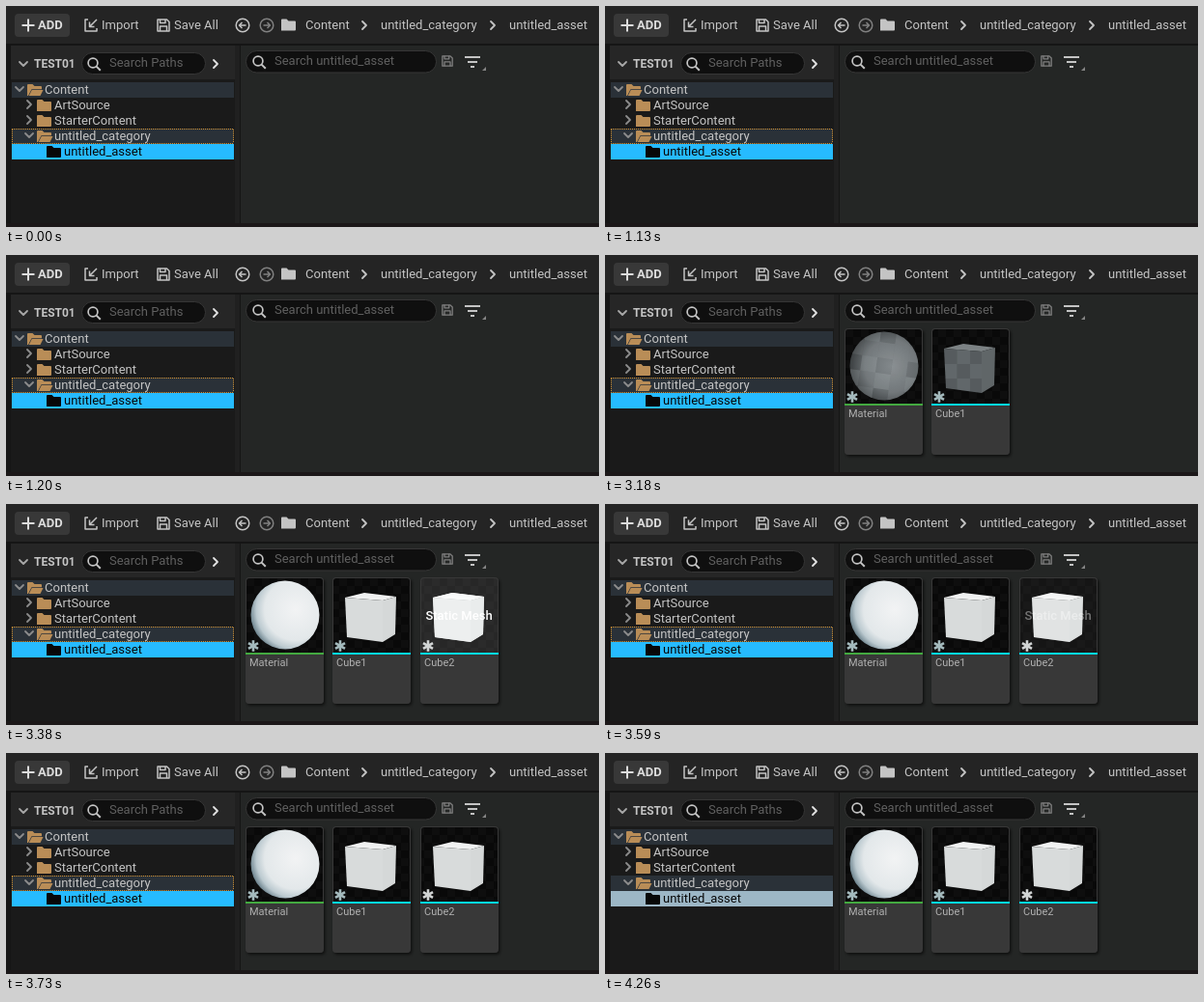
An HTML page that plays this animation: 614 px wide and 229 px high, repeating every 4590 ms.

```html
<!DOCTYPE html>
<html lang="en">
<head>
<meta charset="utf-8">
<title>Content browser</title>
<style>
  html, body { margin: 0; width: 100%; height: 100%; overflow: hidden; background: #151515; }
  svg { display: block; width: 614px; height: 229px; }
  text { font: 13px Roboto, Arial, sans-serif; fill: #c4c4c4; white-space: pre; }
  .bold { font-weight: 700; }
  .hint { fill: #606060; }
  .label { font-size: 11px; fill: #b0b0b0; }
  .line { fill: none; stroke: #c4c4c4; stroke-width: 1.5; stroke-linejoin: round; }
  .chev { stroke-width: 1.8; stroke-linecap: round; }
  .pill { fill: #0f0f0f; stroke: #363636; }
</style>
</head>
<body>
<svg id="stage" viewBox="0 0 614 229">
  <defs>
    <pattern id="checks" width="16" height="16" patternUnits="userSpaceOnUse" x="249" y="77">
      <rect width="16" height="16" fill="#090909"/>
      <path d="M0 0h8v8h-8zM8 8h8v8h-8z" fill="#0e0e0e"/>
    </pattern>
    <radialGradient id="ball" cx=".65" cy=".42" r=".68">
      <stop offset="0" stop-color="#f2f3f4"/>
      <stop offset=".66" stop-color="#e3e8ea"/>
      <stop offset=".84" stop-color="#bccad0"/>
      <stop offset="1" stop-color="#627984"/>
    </radialGradient>
    <radialGradient id="dullBall" cx=".6" cy=".5" r=".64">
      <stop offset="0" stop-color="#858b8e"/>
      <stop offset=".6" stop-color="#6c7275"/>
      <stop offset="1" stop-color="#35393b"/>
    </radialGradient>
    <clipPath id="disc"><circle cx="289" cy="115" r="35.5"/></clipPath>
    <clipPath id="front"><path d="M351 97L390 100L390 143L353 138Z"/></clipPath>
    <filter id="soft" x="-20%" y="-20%" width="140%" height="140%">
      <feDropShadow dx="1.5" dy="2" stdDeviation="1.5" flood-color="#000" flood-opacity=".6"/>
    </filter>
  </defs>
</svg>
<script>
const LOOP = 4590;
const CARDS_AT = 3180, LIT_AT = 3250, NEW_AT = 3380, DONE_AT = 3730, BLUR_AT = 4260, STEP = 70;
const stage = document.getElementById('stage');

function add(tag, attrs, parent = stage) {
  const el = document.createElementNS('http://www.w3.org/2000/svg', tag);
  for (const k in attrs) el.setAttribute(k, attrs[k]);
  parent.appendChild(el);
  return el;
}
const group = parent => add('g', {}, parent);
const rect = (x, y, width, height, fill, rx = 0, parent) =>
  add('rect', { x, y, width, height, fill, rx }, parent);
const path = (d, attrs, parent) => add('path', { d, ...attrs }, parent);
const line = (d, attrs = {}, parent) => path(d, { class: 'line', ...attrs }, parent);
function text(x, y, value, attrs = {}, parent) {
  const el = add('text', { x, y, ...attrs }, parent);
  el.textContent = value;
  return el;
}
function chevron(x, y, down, size = 4, stroke = '#c4c4c4') {
  const h = size / 2;
  const d = down ? `M${x - size} ${y - h}l${size} ${size}l${size} ${-size}`
                 : `M${x - h} ${y - size}l${size} ${size}l${-size} ${size}`;
  line(d, { class: 'line chev', style: `stroke:${stroke}` });
}
function folder(x, y, fill, open) {
  const back = `M${x} ${y + 12}v-11q0-1 1-1h4.5l2 2h6.5q1 0 1 1v`;
  if (open) {
    path(back + `2.2h-10.5l-3.5 6.8z`, { fill });
    path(`M${x + 4.8} ${y + 6}h11.7l-3 6h-11.8z`, { fill });
  } else {
    path(back + `8q0 1-1 1h-14z`, { fill });
  }
}
function lens(x, y) {
  add('circle', { class: 'line', cx: x - 1, cy: y - 1, r: 4.9, style: 'stroke-width:1.7' });
  line(`M${x + 2.6} ${y + 2.6}l4.2 4.2`, { style: 'stroke-width:2' });
}
function disk(x, y, s, color) {
  const g = add('g', { transform: `translate(${x} ${y}) scale(${s})` });
  const style = `stroke:${color}`;
  line('M1 1h9.5l2.5 2.500v9.500h-12z', { style }, g);
  line('M3.500 1v3.500h5.500v-3.500M3.500 13v-5h7v5', { style }, g);
}

// Panels
rect(0, 0, 614, 39, '#242424');
rect(5, 41, 232, 35, '#262626');
rect(5, 76, 232, 149, '#1a1a1a');
rect(237, 41, 5, 184, '#202020');
rect(243, 41, 371, 184, '#242625');
rect(0, 225, 614, 4, '#1b1718');

// Toolbar
rect(9, 8, 57, 24, '#383838', 4);
line('M16.500 20h13M23 13.500v13', { style: 'stroke-width:2;stroke:#dcdcdc' });
text(33, 24, 'ADD', { class: 'bold', style: 'fill:#dcdcdc' });
line('M85 14h-3v12h12v-3M94 14l-7 7M86.500 16.500v5h5');
text(99, 24, 'Import');
disk(156, 13, 1, '#c4c4c4');
text(174, 24, 'Save All');
for (const [x, dir, color] of [[245, -1, '#c4c4c4'], [270, 1, '#808080']]) {
  const style = `stroke:${color}`;
  add('circle', { class: 'line', cx: x, cy: 20, r: 6.8, style });
  line(`M${x - 3.5 * dir} 20h${7 * dir}m${-3 * dir} -3l${3 * dir} 3l${-3 * dir} 3`, { style });
}
folder(285, 13.5, '#c4c4c4', false);
text(310, 24, 'Content');
chevron(371, 20, false);
text(388, 24, 'untitled_category');
chevron(504, 20, false);
text(521, 24, 'untitled_asset');

// Search bars
chevron(18, 60, true, 4, '#a8a8a8');
text(29, 64, 'TEST01', { class: 'bold', style: 'font-size:12px' });
add('rect', { class: 'pill', x: 78.5, y: 48.5, width: 128, height: 22, rx: 11 });
lens(91, 60);
text(107, 63, 'Search Paths', { class: 'hint' });
chevron(217, 60, false, 4, '#e2e2e2');
add('rect', { class: 'pill', x: 248.5, y: 46.5, width: 197, height: 22.5, rx: 11 });
lens(262, 58);
text(278, 61, 'Search untitled_asset', { class: 'hint' });
disk(451, 51, .86, '#808080');
line('M475 53h16M478 58h10M481 63h4', { style: 'stroke-width:2' });
path('M497 63v4h-4z', { fill: '#858585' });

// Tree
rect(6, 79, 230, 16, '#2a3138');
rect(6, 127, 230, 16, '#2a3138');
const chosen = rect(6, 143, 230, 16, '#26bbff');
const dots = path('M6 127.500h230M6.500 128v14M235.500 128v14M6 142.500h230',
  { fill: 'none', stroke: '#d4912f', 'stroke-dasharray': '1 1' });
const TAN = '#b98d57';
[
  ['Content', 22, 'open'], ['ArtSource', 32, 'shut'], ['StarterContent', 32, 'shut'],
  ['untitled_category', 32, 'open'], ['untitled_asset', 42, 'leaf']
].forEach(([name, x, kind], i) => {
  const y = 87 + 16 * i, leaf = kind === 'leaf';
  if (!leaf) chevron(x - 8, y - 1, kind === 'open', 4, '#8c8c8c');
  folder(x, y - 6, leaf ? '#080808' : TAN, kind === 'open');
  text(x + 18, y + 4, name, leaf ? { style: 'fill:#080808' } : {});
});

// Asset cards
function card(x, name, accent) {
  const g = group();
  add('rect', { x, y: 76, width: 81, height: 131, rx: 4, fill: '#383838', filter: 'url(#soft)' }, g);
  path(`M${x + 1} 154v-74q0-3 3-3h73q3 0 3 3v74z`, { fill: 'url(#checks)' }, g);
  rect(x, 154, 81, 2, accent, 0, g);
  text(x + 4, 168, name, { class: 'label' }, g);
  return g;
}
function star(x, color, parent) {
  for (let i = 0; i < 3; i++)
    line('M0 -5.800V5.800', {
      transform: `translate(${x} 147) rotate(${i * 60})`,
      style: `stroke:${color};stroke-width:2.6`
    }, parent);
}
function cube(parent, front, top, side) {
  const g = group(parent);
  path('M351 97L371 92L404 96L390 100Z', { fill: top }, g);
  path('M390 100L404 96L403 135L390 143Z', { fill: side }, g);
  path('M351 97L390 100L390 143L353 138Z', { fill: front }, g);
  return g;
}
const show = (el, on) => el.setAttribute('visibility', on ? 'inherit' : 'hidden');

const material = card(248, 'Material', '#43a940');
const dullBall = group(material);
add('circle', { cx: 289, cy: 115, r: 35.5, fill: 'url(#dullBall)' }, dullBall);
const tiles = add('g', { 'clip-path': 'url(#disc)' }, dullBall);
for (let r = 0; r < 5; r++)
  for (let c = 0; c < 5; c++) {
    const tone = (r * 5 + c * 3 + r * c) % 4;
    add('rect', {
      x: 249 + c * 16, y: 75 + r * 16, width: 16, height: 16, transform: 'rotate(8 289 115)',
      fill: tone % 2 ? '#d2d9dc' : '#22282a', 'fill-opacity': .03 + tone * .03
    }, tiles);
  }
const litBall = add('circle', { cx: 289, cy: 115, r: 35.5, fill: 'url(#ball)' }, material);
star(256, '#a4babd', material);

const first = card(338, 'Cube1', '#00dff0');
const dullCube = cube(first, '#5b6163', '#7c8284', '#606668');
const grid = add('g', { 'clip-path': 'url(#front)' }, dullCube);
for (let i = 0; i < 9; i++)
  rect(351 + i % 3 * 13.5, 98 + Math.floor(i / 3) * 15, 13.5, 15,
    i % 2 ? 'rgba(170,180,184,.08)' : 'rgba(40,46,50,.1)', 0, grid);
const litCube = cube(first, '#d8dbdb', '#f0f1f1', '#d5d8d8');
star(346, '#a4babd', first);

const second = card(429, 'Cube2', '#00dff0');
const copy = add('g', { transform: 'translate(91 0)' }, second);
cube(copy, '#d8dbdb', '#f0f1f1', '#d5d8d8');
const veil = path('M430 154v-74q0-3 3-3h73q3 0 3 3v74z', { fill: '#fff' }, second);
const glow = cube(copy, '#eaeded', '#f8f9f9', '#e6e9e9');
star(437, '#d2d5d5', second);
const caption = text(469, 120, 'Static Mesh',
  { 'text-anchor': 'middle', style: 'fill:#fff;font-weight:500' }, second);

function draw(t) {
  const lit = t >= LIT_AT;
  for (const el of [material, first]) show(el, t >= CARDS_AT);
  for (const el of [dullBall, dullCube]) show(el, !lit);
  for (const el of [litBall, litCube]) show(el, lit);
  show(second, t >= NEW_AT);
  const step = Math.floor((t - NEW_AT) / STEP) * STEP;
  const fade = Math.min(1, Math.max(0, 1 - step / (DONE_AT - NEW_AT)));
  caption.setAttribute('opacity', fade);
  glow.setAttribute('opacity', fade);
  veil.setAttribute('opacity', fade * .12);
  const blurred = t >= BLUR_AT;
  show(dots, !blurred);
  chosen.setAttribute('fill', blurred ? '#9db7c6' : '#26bbff');
}

const start = performance.now();
function tick() {
  draw((performance.now() - start) % LOOP);
  requestAnimationFrame(tick);
}
draw(0);
requestAnimationFrame(tick);
</script>
</body>
</html>
```
